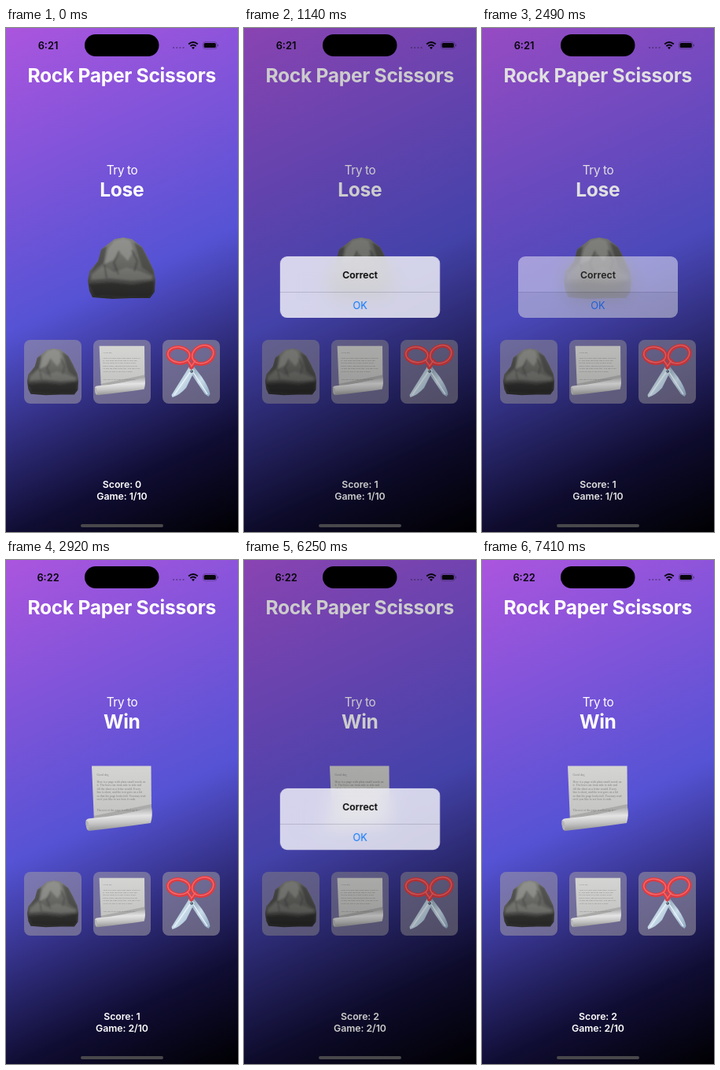
These frames come from a looping animation (295x640 px, 8000 ms). An HTML page:

```html
<!DOCTYPE html>
<html lang="en">
<head>
<meta charset="utf-8">
<title>Rock Paper Scissors</title>
<style>
html, body { margin: 0; width: 100%; height: 100%; overflow: hidden; background: #000; }
body { position: relative; font-family: Inter, "Liberation Sans", sans-serif; }
svg { position: absolute; left: 0; top: 0; width: 295px; height: 640px; }
text { font-family: Inter, "Liberation Sans", sans-serif; fill: #fff; text-anchor: middle; }
.big { font-weight: 700; font-size: 24.6px; letter-spacing: -.3px; }
.info { font-weight: 600; font-size: 12.3px; letter-spacing: -.05px; }
.letter text { font-family: "Liberation Serif", serif; font-size: 3.8px; fill: #808080; text-anchor: start; }
#alert {
  position: absolute; left: 46px; top: 290px; width: 203px; height: 78px;
  border-radius: 9px; overflow: hidden; text-align: center;
  background: rgba(245, 244, 250, .83); backdrop-filter: blur(12px);
}
#alert div { box-sizing: border-box; }
#head { height: 45px; line-height: 45px; padding-top: .5px; font-size: 12.3px; font-weight: 600; color: #000; }
#ok { height: 33px; line-height: 33px; border-top: 1px solid rgba(60, 60, 80, .2); font-size: 12.8px; color: #0a7aff; }
</style>
</head>
<body>
<svg viewBox="0 0 295 640">
  <defs>
    <linearGradient id="sky" gradientUnits="userSpaceOnUse" x2="295" y2="640">
      <stop stop-color="#ab55de"/>
      <stop offset=".5" stop-color="#5553d4"/>
      <stop offset=".83" stop-color="#100d34"/>
      <stop offset="1" stop-color="#000002"/>
    </linearGradient>
    <linearGradient id="stone" x2="0" y2="1">
      <stop stop-color="#80807c"/>
      <stop offset=".5" stop-color="#62625f"/>
      <stop offset=".68" stop-color="#4c4c4a"/>
      <stop offset="1" stop-color="#2c2c2b"/>
    </linearGradient>
    <linearGradient id="sheet" x2="0" y2="1">
      <stop stop-color="#d4d4d2"/>
      <stop offset="1" stop-color="#c2c2c1"/>
    </linearGradient>
    <linearGradient id="roll" x1=".45" x2=".55" y2="1">
      <stop stop-color="#a2a2a2"/>
      <stop offset=".4" stop-color="#e4e4e4"/>
      <stop offset=".65" stop-color="#c6c6c6"/>
      <stop offset="1" stop-color="#8e8e8e"/>
    </linearGradient>
    <linearGradient id="steel" x2="1" y2="1">
      <stop stop-color="#7f93a8"/>
      <stop offset=".5" stop-color="#c9dcea"/>
      <stop offset="1" stop-color="#8fa9c2"/>
    </linearGradient>
    <filter id="soft"><feGaussianBlur stdDeviation="1.3"/></filter>
    <clipPath id="outline"><use href="#body"/></clipPath>

    <g id="rock">
      <path id="body" fill="url(#stone)" d="M138 268L149 266L160 268L173 278L181 293L188 308L190 320L189 335L183 343L160 343L135 344L110 342L106 334L104 321L106 309L117 296L121 281Z"/>
      <g filter="url(#soft)" clip-path="url(#outline)">
        <path fill="#9a9a95" opacity=".65" d="M138 270L149 267L158 270L162 283L155 296L145 285L136 295L125 300L130 280Z"/>
        <path fill="#3c3c3a" opacity=".6" d="M120 281L128 277L124 298L108 311L115 297Z"/>
        <path fill="#3c3c3a" opacity=".6" d="M163 272L174 279L187 307L188 314L173 304Z"/>
        <path fill="#858581" opacity=".5" d="M109 313L124 302L138 310L153 304L171 309L186 315L185 319L160 321L132 318L108 320Z"/>
        <path fill="#222" opacity=".6" d="M105 325L134 323L160 326L189 321L187 338L181 342L112 340Z"/>
        <path fill="none" stroke="#3a3a38" stroke-width="2" opacity=".6" d="M144 283L137 298L143 313M160 282L167 296L163 309M125 300L128 318"/>
      </g>
    </g>

    <g id="paper">
      <path fill="url(#sheet)" d="M109 261.500H184.500L185 318L112 332Z"/>
      <g class="letter" id="letter"></g>
      <path fill="#777" opacity=".35" d="M111 325L185 310V316L111 330Z"/>
      <path fill="url(#roll)" d="M101.500 331Q103 328 108 328Q148 325 185 313.500Q187 324 184 334Q150 339 105 344Q101 339 101.500 331Z"/>
      <ellipse cx="103.500" cy="337" rx="1.800" ry="6" fill="#b5b5b5" transform="rotate(-8 103.500 337)"/>
    </g>

    <g id="scissors">
      <path fill="url(#steel)" d="M232 434L239 430L249 443Q258 456 259.500 465L257.500 468L253 465Z"/>
      <path fill="none" stroke="#eef6fb" stroke-width="1.300" d="M238 437L256 465"/>
      <path fill="url(#steel)" d="M233 430L240 435L229 457Q221 466 211.500 469L210.500 466Z"/>
      <path fill="none" stroke="#eef6fb" stroke-width="1.300" d="M234 437L214 466"/>
      <g fill="none" stroke="#dc3c42" stroke-width="5" stroke-linecap="round">
        <g id="loops">
          <ellipse cx="220" cy="415.500" rx="14" ry="9.800" transform="rotate(8 220 415.500)"/>
          <ellipse cx="250.500" cy="415" rx="14" ry="11" transform="rotate(-25 250.500 415)"/>
          <path d="M231 422L236.500 430M241 423L235.500 431"/>
        </g>
      </g>
      <use href="#loops" fill="none" stroke="#f4686b" stroke-width="1.500" transform="translate(-.3 -.6)"/>
      <circle cx="236" cy="436" r="1.800" fill="#34404c"/>
      <circle cx="235.700" cy="435.700" r=".7" fill="#c4d0da"/>
    </g>
    <rect id="card" y="396" width="73" height="81" rx="8" fill="#a09ba5" fill-opacity=".55"/>
  </defs>

  <rect width="295" height="640" fill="url(#sky)"/>

  <text id="clock" x="53.500" y="26.500" style="font-size:12.8px;font-weight:600;fill:#08060c"></text>
  <g fill="#08060c" opacity=".35">
    <circle cx="213" cy="25" r="1.100"/><circle cx="217.200" cy="25" r="1.100"/>
    <circle cx="221.400" cy="25" r="1.100"/><circle cx="225.600" cy="25" r="1.100"/>
  </g>
  <g fill="none" stroke="#08060c" stroke-width="1.900">
    <path d="M232.200 20.500Q238 15.500 243.800 20.500M234.400 23Q238 20 241.600 23"/>
    <path fill="#08060c" stroke="none" d="M236 24.700Q238 23.200 240 24.700L238 26.900Z"/>
  </g>
  <rect x="250.500" y="17.700" width="17.500" height="8.600" rx="2.700" fill="none" stroke="#08060c" stroke-opacity=".35" stroke-width=".8"/>
  <rect x="251.700" y="18.900" width="15.100" height="6.200" rx="1.700" fill="#08060c"/>
  <path d="M269 20.500Q271 22 269 23.500Z" fill="#08060c" opacity=".5"/>

  <text class="big" x="147.200" y="68.500">Rock Paper Scissors</text>
  <text x="147.500" y="186" style="font-size:15.3px;letter-spacing:-.4px">Try to</text>
  <text class="big" id="goal" x="147.300" y="214"></text>
  <use id="move"/>

  <use href="#card" x="23"/>
  <use href="#rock" transform="translate(59.500 436.700) scale(.76) translate(-147 -305)"/>
  <use href="#card" x="111"/>
  <use href="#paper" transform="translate(147.500 436.700) scale(.76) translate(-147 -305)"/>
  <g id="choice">
    <use href="#card" x="199"/>
    <use href="#scissors"/>
  </g>

  <text class="info" id="score" x="147.500" y="584.300"></text>
  <text class="info" id="game" x="147.500" y="599.300"></text>
  <rect id="dim" width="295" height="640"/>
  <rect x="100" y="8" width="94.500" height="28" rx="14"/>
  <rect x="95" y="630" width="105" height="4" rx="2" fill="#48484b"/>
</svg>
<div id="alert"><div id="head">Correct</div><div id="ok">OK</div></div>

<script>
const $ = id => document.getElementById(id);
const LOOP = 8000, NEXT_ROUND = 2920;
const taps = [
  { press: 500, open: 680, ok: 2280, close: 2400 },
  { press: 5700, open: 5800, ok: 6780, close: 6940 }
];

const lines = ['Good day,', '', 'Here is a page with plain small words on',
  'it. The lines run from side to side and', 'fill the sheet as a letter would. Every',
  'line is short, and the text goes on a bit', 'so that the page looks full. You may read',
  'on if you like to see how it ends.', '', '', 'The rest of the page is rolled up here'];
$('letter').innerHTML = lines.map((s, i) => `<text x="115.500" y="${273.5 + i * 4.5}">${s}</text>`).join('');

// Critically damped spring from 0 to 1
function spring(ms) {
  const x = 15 * Math.max(ms, 0) / 1000;
  return 1 - (1 + x) * Math.exp(-x);
}

function draw(t) {
  const second = t >= NEXT_ROUND;
  const tap = taps[+second];
  const shown = spring(t - tap.open);
  const alpha = shown * (1 - spring(t - tap.close));

  $('clock').textContent = second ? '6:22' : '6:21';
  $('goal').textContent = second ? 'Win' : 'Lose';
  $('move').setAttribute('href', second ? '#paper' : '#rock');
  $('score').textContent = 'Score: ' + taps.filter(p => t >= p.open).length;
  $('game').textContent = `Game: ${second ? 2 : 1}/10`;

  const back = Math.min(Math.max((t - tap.open) / 200, 0), 1);
  $('choice').setAttribute('opacity', t < tap.press ? 1 : .25 + .75 * back);
  $('dim').setAttribute('opacity', .2 * alpha);

  const box = $('alert').style;
  box.visibility = alpha > .01 ? 'visible' : 'hidden';
  box.opacity = alpha;
  box.transform = `scale(${1.2 - .2 * shown})`;
  $('ok').style.background = t >= tap.ok ? 'rgba(0,0,0,.08)' : 'none';
}

const start = performance.now();
function tick() {
  draw((performance.now() - start) % LOOP);
  requestAnimationFrame(tick);
}
tick();
</script>
</body>
</html>
```
